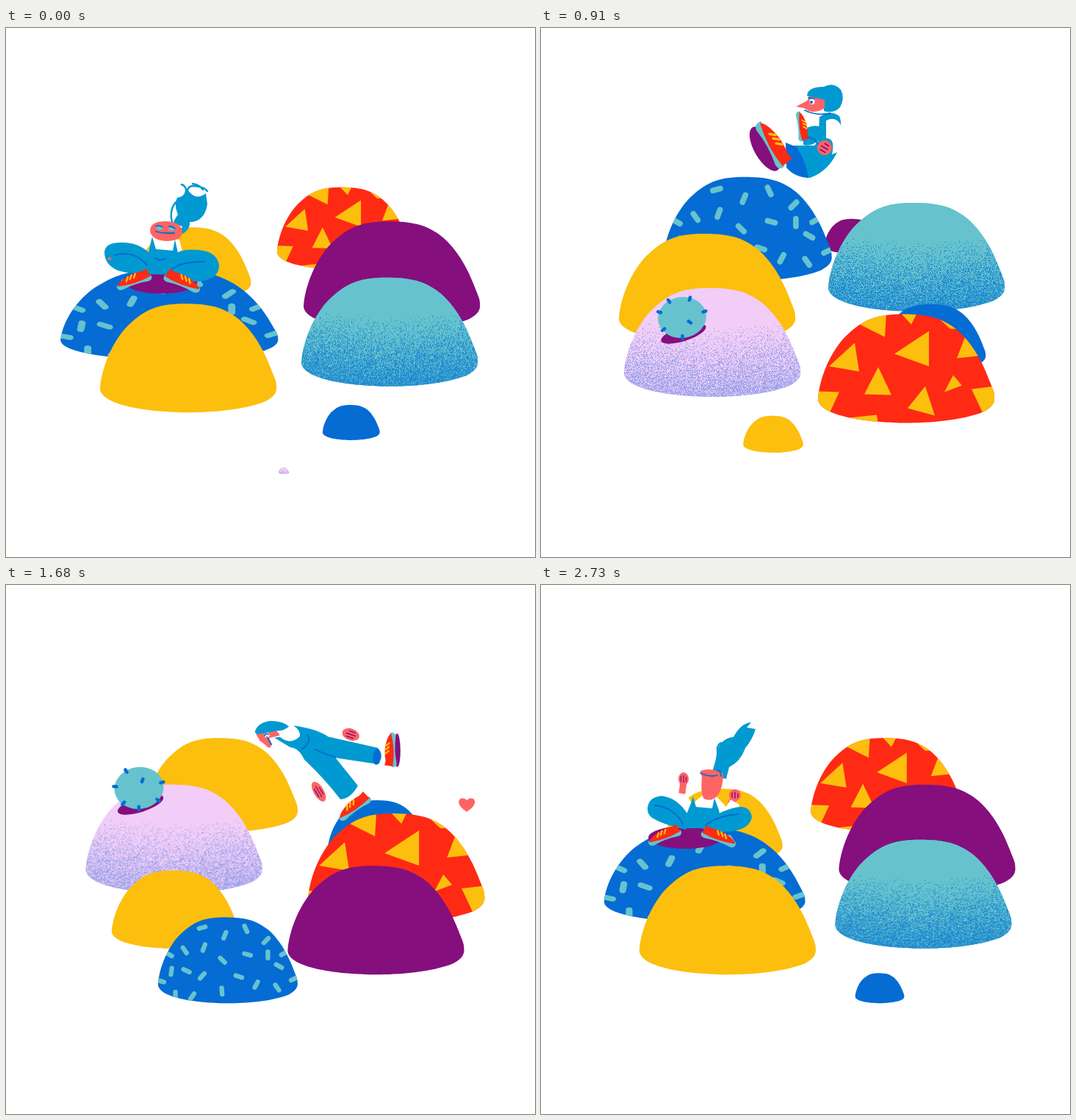
Animation of 720x720 px, one loop 2.8 s. Source, as an HTML page with a canvas:

```html
<!DOCTYPE html>
<html lang="en">
<head>
<meta charset="utf-8">
<title>Hill jumper</title>
<style>
html, body { margin: 0; width: 100%; height: 100%; overflow: hidden; background: #fff; }
canvas { display: block; width: 720px; height: 720px; }
</style>
</head>
<body>
<canvas id="stage" width="720" height="720"></canvas>
<script>
const ctx = document.getElementById('stage').getContext('2d');
const LOOP = 2800, STEP = 70;
const SKY = '#0099d1', BLUE = '#046cd3', CORAL = '#ff6464', RED = '#ff2a14', YELLOW = '#fcbf0e',
  PURPLE = '#850f7d', TEAL = '#66c3cd', LILAC = '#f1cdf7', WHITE = '#fff';

// Smooth monotone interpolation of one column of [time, ...values] keys.
function track(keys, t, col = 1) {
  const last = keys.length - 1;
  if (t <= keys[0][0]) return keys[0][col];
  if (t >= keys[last][0]) return keys[last][col];
  const i = keys.findIndex(k => k[0] > t) - 1;
  const secant = j => j < 0 || j >= last ? 0 : (keys[j + 1][col] - keys[j][col]) / (keys[j + 1][0] - keys[j][0]);
  const slope = j => {
    if (j === 0) return secant(0);
    if (j === last) return secant(last - 1);
    const a = secant(j - 1), b = secant(j);
    return a * b <= 0 ? 0 : 2 * a * b / (a + b);
  };
  const h = keys[i + 1][0] - keys[i][0], u = (t - keys[i][0]) / h, v = 1 - u;
  return keys[i][col] * v * v * (1 + 2 * u) + keys[i + 1][col] * u * u * (3 - 2 * u)
    + h * u * v * (slope(i) * v - slope(i + 1) * u);
}

function fill(color, path) {
  ctx.fillStyle = color;
  ctx.fill(path instanceof Path2D ? path : new Path2D(path));
}
function line(color, path, width = 2) {
  ctx.strokeStyle = color;
  ctx.lineWidth = width;
  ctx.lineCap = ctx.lineJoin = 'round';
  ctx.stroke(new Path2D(path));
}
function oval(color, x, y, rx, ry = rx, deg = 0) {
  ctx.fillStyle = color;
  ctx.beginPath();
  ctx.ellipse(x, y, rx, ry, deg * Math.PI / 180, 0, 7);
  ctx.fill();
}
function place(x, y, deg, sx, sy, draw) {
  ctx.save();
  ctx.translate(x, y);
  ctx.rotate(deg * Math.PI / 180);
  ctx.scale(sx, sy);
  draw();
  ctx.restore();
}

// ---- Hills ----
const HILL = new Path2D('M-120,-33C-117,-68 -98,-105 -78,-122C-58,-140 -42,-147 -10,-148C20,-148 45,-147 70,-126C95,-104 108,-72 114,-56C118,-46 120,-42 120,-36C121,-28 118,-22 105,-15C75,-3 30,0 0,0C-45,0 -120,-8 -120,-33Z');
const TRIANGLES = new Path2D('M-70,-109L-64,-70L-105,-77ZM31,-125L31,-77L-16,-94ZM-38,-76L-20,-38L-57,-39ZM26,-50L39,-10L2,-20ZM64,-65L76,-51L52,-42ZM-65,-135L-27,-150L-29,-117ZM-7,-149L15,-150L7,-134ZM36,-150L50,-150L70,-128L60,-128ZM82,-122L106,-92L69,-88ZM-122,-43L-91,-42L-105,-12L-125,-16ZM89,-46L122,-50L122,-20L104,-14ZM-77,-7L-40,-11L-38,3Z');
const SPRINKLES = [
  [-44, -130, -15], [-5, -117, -68], [31, -128, 65], [66, -108, -45], [-74, -91, 55], [-41, -96, -70],
  [-101, -84, 30], [-9, -74, 45], [34, -84, 15], [69, -83, 90], [97, -86, -30], [-97, -55, -82],
  [-71, -56, 25], [-44, -47, -48], [19, -46, 18], [49, -32, -62], [88, -64, 30], [85, -27, 55],
  [-115, -38, 15], [-10, -21, 85], [-61, -12, -55], [-90, -14, 90], [114, -42, -25]];

function grainTexture(base, grain, strength) {
  const tile = document.createElement('canvas');
  tile.width = 244; tile.height = 150;
  const g = tile.getContext('2d');
  let seed = 7;
  const random = () => (seed = (seed * 16807) % 2147483647) / 2147483647;
  g.fillStyle = base;
  g.fillRect(0, 0, 244, 150);
  g.fillStyle = grain;
  for (let y = 40; y < 150; y++) for (let x = 0; x < 244; x++) {
    const side = Math.abs(x - 122) / 122;
    g.globalAlpha = 0.5 + 0.4 * random();
    if (random() < strength * (y - 56 + 14 * side) / 90) g.fillRect(x, y, 1, 1);
  }
  return tile;
}
const texture = tile => () => ctx.drawImage(tile, -122, -149);
const drawTriangles = () => fill(YELLOW, TRIANGLES);
const drawSprinkles = () => SPRINKLES.forEach(([x, y, deg]) =>
  place(x, y, deg, 1, 1, () => line(TEAL, 'M-5.5,0H5.5', 8)));

const LEFT = [[0, 378], [70, 354], [210, 316], [490, 268], [700, 248], [910, 233], [1190, 224], [1470, 222],
  [1610, 226], [1960, 242], [2310, 281], [2590, 343], [2740, 392]];
const RIGHT = [[0, 405], [140, 437], [280, 461], [420, 478], [560, 497], [840, 517], [1050, 522], [1260, 532],
  [1540, 526], [1750, 525], [1960, 511], [2240, 492], [2380, 471], [2520, 448], [2660, 424], [2740, 410]];
const BASE = [[0, 607], [210, 578], [490, 545], [910, 502], [1470, 444], [1960, 386], [2310, 344], [2660, 307], [2800, 292]];
const SIZE = [[0, .06], [70, .29], [140, .496], [210, .667], [350, .9], [420, 1], [2170, 1], [2240, .99], [2310, .955],
  [2380, .865], [2450, .757], [2520, .61], [2660, .32], [2730, 0]];
const SMALL_LEFT = [[0, .4], [210, .51], [770, .688], [1260, .745], [1610, .767], [2060, .67], [2590, .53]];
const SMALL_RIGHT = [[0, .33], [350, .36], [840, .6], [1260, .61], [1820, .65], [2310, .45], [2660, .47]];
const SPRINKLE_SQUASH = [[0, 1], [70, .85], [140, .4], [210, 0], [2660, 0], [2730, .6], [2800, 1]];
const RED_SQUASH = [[1400, 0], [1470, .35], [1540, .55], [1610, .3], [1680, 0]];

const hills = {
  lilac: { born: 0, path: LEFT, color: LILAC, detail: texture(grainTexture(LILAC, '#7f96e6', .72)) },
  lowYellow: { born: 700, path: LEFT, color: YELLOW, ratio: SMALL_LEFT },
  sprinkled: { born: 1400, path: LEFT, color: BLUE, detail: drawSprinkles, squash: SPRINKLE_SQUASH },
  yellow: { born: 2100, path: LEFT, color: YELLOW },
  red: { born: 350, path: RIGHT, color: RED, detail: drawTriangles, squash: RED_SQUASH },
  purple: { born: 1050, path: RIGHT, color: PURPLE },
  teal: { born: 1750, path: RIGHT, color: TEAL, detail: texture(grainTexture(TEAL, '#0a78d2', .85)) },
  lowBlue: { born: 2450, path: RIGHT, color: BLUE, ratio: SMALL_RIGHT }
};

function hillState(hill, t) {
  const age = (t - hill.born + LOOP) % LOOP;
  const size = track(SIZE, age) * (hill.ratio ? track(hill.ratio, age) : 1);
  const squash = hill.squash ? track(hill.squash, t) : 0;
  return { hill, age, size, x: track(hill.path, age), y: track(BASE, age),
    sx: size * (1 + .233 * squash), sy: size * (1 - .17 * Math.sqrt(squash)) };
}

function drawHill(s, t) {
  if (s.size <= 0) return;
  place(s.x, s.y, 0, s.sx, s.sy, () => {
    fill(s.hill.color, HILL);
    if (s.hill.detail) { ctx.clip(HILL); s.hill.detail(); }
  });
  if (s.hill === hills.lilac) drawBall(s, t);
}

const BALL = [[420, -25, -75, 0], [490, -28, -80, .28], [910, -41, -108, 1], [1470, -48, -134, 1.02],
  [1960, -46, -151, 1.02], [2310, -44, -151, 1]];

function drawBall(s, t) {
  const r = track(BALL, t, 3);
  if (r <= 0) return;
  place(s.x + track(BALL, t, 1) * s.size, s.y + track(BALL, t, 2) * s.size, 0, r * s.size, r * s.size, () => {
    if (r > .4) oval(PURPLE, 2, 22, 32, 10, -18);
    oval(TEAL, 0, 0, 33, 28, -8);
    if (r < .4) return;
    for (let i = 0; i < 7; i++) {
      const a = i * .93 - t / 420, reach = i === 3 ? .4 : 1;
      place(Math.cos(a) * 32 * reach, Math.sin(a) * 27 * reach, a * 180 / Math.PI, 1, 1,
        () => line(BLUE, 'M-2,0H2', 4.5));
    }
  });
}

// ---- Character ----
function shoe(x, y, deg, size = 1, flip = 1, under = 0) {
  place(x, y, deg, size, size * flip, () => {
    if (under) oval(PURPLE, 0, 10, 26, under);
    fill(TEAL, 'M-26,1Q0,5 27,-1Q29,7 21,8Q0,5 -20,9Q-28,9 -26,1Z');
    fill(RED, 'M-25,3L-23,-10Q-17,-7 -10,-9L1,-9Q22,-6 26,1Q0,7 -25,3Z');
    line(YELLOW, 'M-5,-8L-1,-3M1,-8L5,-3M7,-7L11,-2', 2.6);
  });
}
function hand(x, y, rx, ry = rx, deg = 0) {
  place(x, y, deg, rx / 8, ry / 8, () => {
    oval(CORAL, 0, 0, 8);
    line(PURPLE, 'M-4,3V-3M0,4V-4M4,3V-2', 1.5);
  });
}

function sitLow() {
  fill(SKY, 'M236,282Q251,276 250,264Q270,264 274,240Q273,232 272,225Q258,236 247,220Q244,229 233,231Q228,240 234,254Q228,262 228,266L240,270Z');
  line(SKY, 'M226,264Q222,250 230,238Q247,228 245,219Q243,214 239,213', 2.5);
  line(SKY, 'M247,226Q246,214 256,215Q270,216 274,222M254,212Q263,213 268,220', 2.5);
  fill(WHITE, 'M199,284L236,288L241,308L193,308Z');
  fill(SKY, 'M188,335L195,300L199,284L204,301L227,303L230,288L234,306L236,336Z');
  fill(SKY, 'M134,305Q135,291 160,292Q185,293 198,310L202,330Q175,337 152,330Q134,322 134,305Z');
  fill(SKY, 'M214,332Q220,306 245,302Q286,299 290,322Q291,342 262,345Q230,346 214,332Z');
  line(BLUE, 'M148,309Q175,302 192,323M219,335Q230,318 270,318M203,313Q209,318 217,314');
  oval(CORAL, 141, 314, 2.5, 2);
  fill(CORAL, 'M196,276Q196,263 218,263Q240,264 240,279Q238,290 218,290Q198,289 196,276Z');
  oval(TEAL, 209, 272, 5, 3); oval(TEAL, 226, 273, 5, 3);
  line(BLUE, 'M204,277Q215,280 229,279M204,270Q209,268 213,271M222,270Q227,270 230,273', 1.8);
  shoe(174, 343, 160, .92, -1);
  shoe(240, 345, 23, .97);
}
function floatAway() {
  fill(SKY, 'M306,114Q305,98 322,92Q332,82 345,84Q362,75 366,88Q366,98 356,98Q345,98 340,108Q325,120 312,118Q306,118 306,114Z');
  line(SKY, 'M348,83Q340,82 339,76', 2.5);
  fill(CORAL, 'M353,97Q362,97 366,90Q365,99 359,103Z');
  fill(SKY, 'M303,140Q304,120 322,117Q327,122 324,134L342,148L342,165Q347,176 347,190Q332,196 318,190Q318,170 313,155Q304,150 303,140Z');
  fill(SKY, 'M334,140Q342,137 346,144L352,152L350,171L341,168Z');
  line(BLUE, 'M336,142Q343,150 343,164');
  fill(SKY, 'M340,130L350,123L346,132Z');
  fill(BLUE, 'M318,186Q332,178 347,185Q346,198 333,199Q320,197 318,186Z');
  hand(327, 145, 6.5, 8, 20);
  shoe(355, 153, -78, .7);
  shoe(352, 203, -4, 1.08, 1, 6);
  oval(RED, 315, 206, 4, 7, -10); oval(RED, 307, 208, 1.5, 2.5);
}
function kickBack() {
  fill(SKY, 'M340,160L372,160Q382,152 378,142L379,121Q395,111 406,120Q411,130 405,165Q392,195 366,204Q345,202 335,188Z');
  fill(WHITE, 'M388,126Q405,118 411,140Q415,160 409,167L396,172Q401,150 388,150Z');
  fill(BLUE, 'M333,156L348,162Q361,182 364,204Q345,203 334,190Z');
  fill(SKY, 'M356,139Q370,130 383,135L379,152Q368,162 357,159Z');
  line(BLUE, 'M362,148Q372,150 377,158');
  hand(386, 163, 10, 10, -60);
  shoe(316, 158, -120, 1.3, -1, 11);
  shoe(355, 134, -98, .76, -1);
  fill(SKY, 'M362,92Q363,80 385,80Q398,73 408,84Q414,95 407,108Q398,117 385,113Q386,100 375,99Z');
  fill(CORAL, 'M347,107L362,99L366,93L386,98L386,109Q375,116 365,113L358,109Z');
  oval(WHITE, 369, 100, 3.5, 4); oval(BLUE, 368, 101, 2);
  line(BLUE, 'M359,112Q375,120 394,116M364,95L372,96', 1.8);
}
function landRight() {
  fill(WHITE, 'M424,216L450,210Q472,222 500,240L518,258L510,268L482,262L447,262L444,300L432,300L430,250Z');
  hand(439, 310, 7, 15);
  hand(516, 265, 8, 12, -40);
  fill(SKY, 'M424,216L431,219Q437,236 455,232Q460,226 455,215Q480,235 488,252L538,299Q542,312 528,319L482,282Q486,310 489,330Q472,340 459,334Q455,300 444,262Q446,245 436,238Z');
  line(BLUE, 'M449,249Q466,246 465,236M464,258Q470,268 482,281', 1.8);
  oval(BLUE, 531, 309, 5, 11, 35);
  shoe(470, 352, 174, .95, -1);
  shoe(552, 311, -60, .88, 1, 5);
  fill(CORAL, 'M405,200L420,197Q434,208 432,217L418,213Q415,229 410,223Q408,216 405,210Z');
  fill(SKY, 'M405,196Q414,187 430,193Q446,202 449,213Q440,215 432,210L406,200Z');
  oval(WHITE, 417, 208, 3.5);
  line(BLUE, 'M414,207Q418,204 419,208M416,210V222', 1.8);
}
function upsideDown() {
  fill(SKY, 'M331,60L360,52L374,106Q375,122 366,121L345,100Z');
  fill(SKY, 'M306,80Q316,74 332,76L350,100Q372,128 381,150Q380,166 370,164Q358,158 350,140L338,138Q328,130 328,115Z');
  fill(WHITE, 'M342,102L352,96Q368,115 378,150Q373,160 364,152Q345,130 342,102Z');
  line(BLUE, 'M336,102Q344,112 344,122');
  shoe(345, 52, 24, .68, -1);
  shoe(316, 71, 8, .76, -1);
  fill(SKY, 'M329,152Q330,142 348,146Q354,150 356,165Q362,182 385,180Q385,196 370,195L350,193Q344,182 334,178Q328,165 329,152Z');
  fill(CORAL, 'M362,176Q370,166 386,171L384,182L366,182Z');
  line(PURPLE, 'M379,176L385,172');
  oval(CORAL, 340, 89, 8, 9);
  line(CORAL, 'M335,88L327,84M337,84L332,73M341,82L340,71M345,86L347,78M343,92L346,102', 4);
  oval(PURPLE, 340, 88, 2);
}
function lieBack() {
  line('#f9d8d0', 'M298,95L306,83M317,80L314,108', 1.5);
  hand(308, 62, 10, 6, 35);
  fill(SKY, 'M310,119Q325,125 337,119Q343,135 325,146Q312,150 306,140Z');
  oval(WHITE, 323, 127, 9, 6, 15);
  line(BLUE, 'M319,147Q325,143 322,152');
  fill(SKY, 'M225,145L285,135Q312,130 306,148Q280,156 226,180Q216,162 225,145Z');
  fill(SKY, 'M230,102Q240,112 300,116Q314,124 305,140Q280,136 222,138Q210,130 218,112Z');
  line(BLUE, 'M234,140Q285,132 292,142');
  oval(BLUE, 224, 119, 10, 18, 25); oval(BLUE, 224, 162, 8, 18);
  shoe(206, 99, -84, 1.42, -1, 9);
  shoe(193, 157, -107, 1.12, -1, 8);
  fill(CORAL, 'M338,104L352,109Q358,114 355,122L347,136Q338,128 340,115Z');
  line(PURPLE, 'M339,106L345,112');
  fill(SKY, 'M356,110Q374,112 378,135Q385,160 370,172Q362,190 348,189Q342,182 348,168Q352,148 362,142Q350,138 347,134Z');
}
function sitTall() {
  fill(SKY, 'M234,254Q240,248 239,228Q245,208 262,207Q272,188 286,187L280,194L292,196Q288,210 278,222Q272,240 256,248L252,264Q240,262 234,254Z');
  line(SKY, 'M235,252Q242,232 240,222Q242,216 245,215', 2.5);
  line(CORAL, 'M194,268L192,283M263,290L259,296', 9);
  hand(194, 264, 7, 9); hand(264, 286, 8);
  fill(WHITE, 'M187,283L198,285L206,298L220,286L240,289L252,302L258,292L270,299L268,308L250,318L200,314L188,300Z');
  fill(SKY, 'M190,331L203,300L207,288L211,302L233,304L236,290L242,306L247,331Z');
  fill(SKY, 'M145,303Q147,288 165,287Q190,291 204,320L197,333Q165,326 150,316Q144,310 145,303Z');
  fill(SKY, 'M218,331Q232,312 260,304Q284,297 287,316Q284,332 260,335Q235,338 218,331Z');
  line(BLUE, 'M155,300Q180,302 194,326M224,327Q240,314 268,312');
  fill(CORAL, 'M217,253Q230,248 248,256Q248,270 244,280Q236,297 222,291Q217,286 219,262Z');
  line(BLUE, 'M217,256Q230,262 240,259M240,253Q244,250 245,260', 1.8);
  shoe(168, 341, 158, .88, -1);
  shoe(242, 343, 21, .92);
}

const POSES = [[0, sitLow], [490, floatAway], [910, kickBack], [1470, landRight], [1960, upsideDown], [2310, lieBack], [2730, sitTall], [2800, sitLow]];
const FLIGHT = [[0, 212, 300], [70, 212, 303], [140, 214, 298], [280, 262, 215], [490, 340, 147], [700, 346, 139],
  [910, 352, 142], [1190, 405, 160], [1330, 460, 225], [1470, 500, 280], [1540, 500, 286], [1610, 495, 275],
  [1750, 420, 170], [1960, 340, 118], [2100, 315, 112], [2310, 280, 125], [2520, 240, 190], [2660, 221, 272],
  [2730, 218, 285], [2800, 212, 300]];
const TURN = [[0, 0], [1540, 0], [1960, -155], [2310, -250], [2660, -360], [2800, -360]];

function drawCharacter(t) {
  const [at, draw] = POSES.reduce((best, p) => Math.abs(p[0] - t) < Math.abs(best[0] - t) ? p : best);
  place(track(FLIGHT, t, 1), track(FLIGHT, t, 2), track(TURN, t) - track(TURN, at), 1, 1, () => {
    ctx.translate(-track(FLIGHT, at, 1), -track(FLIGHT, at, 2));
    draw();
  });
}

function drawShadows(t) {
  const left = track([[0, 1], [140, .8], [210, 0], [2590, 0], [2730, 1.03], [2800, 1]], t);
  const right = track([[1330, 0], [1470, 1], [1540, 1], [1680, 0]], t);
  const s = hillState(hills.sprinkled, t), r = hillState(hills.red, t);
  const dx = t > 2500 ? track([[2730, -26], [2800, -11]], t) : -11;
  if (left > 0) oval(PURPLE, s.x + dx, s.y - 105 + (dx + 11) * .7, 49 * left, 15 * left);
  if (right > 0) oval(PURPLE, r.x - 32, r.y - 123, 48 * right, 17 * right, -9);
}

const HEART = 'M0,10C-16,0 -12,-9 -6,-9Q-2,-9 0,-6Q2,-9 6,-9C12,-9 16,0 0,10Z';
const HEARTS = [
  [[280, 114, 268, 0], [350, 113, 262, .8], [490, 111, 246, 1], [630, 112, 228, .9], [800, 113, 205, 0]],
  [[1330, 611, 328, 0], [1400, 614, 323, .8], [1470, 618, 317, 1.1], [1750, 630, 293, .9], [1960, 638, 275, .28], [2030, 640, 270, 0]]];

function drawHearts(t) {
  for (const keys of HEARTS) {
    const size = track(keys, t, 3);
    if (size > 0) place(track(keys, t, 1), track(keys, t, 2), 0, size, size * Math.min(1, .65 + size * .35),
      () => fill(CORAL, HEART));
  }
}

function render(t) {
  ctx.fillStyle = WHITE;
  ctx.fillRect(0, 0, 720, 720);
  Object.values(hills).map(h => hillState(h, t)).sort((a, b) => b.age - a.age).forEach(s => drawHill(s, t));
  drawShadows(t);
  drawHearts(t);
  drawCharacter(t);
}

const start = performance.now();
function tick() {
  const t = (performance.now() - start) % LOOP;
  render(Math.floor(t / STEP) * STEP);
  requestAnimationFrame(tick);
}
tick();
</script>
</body>
</html>
```
